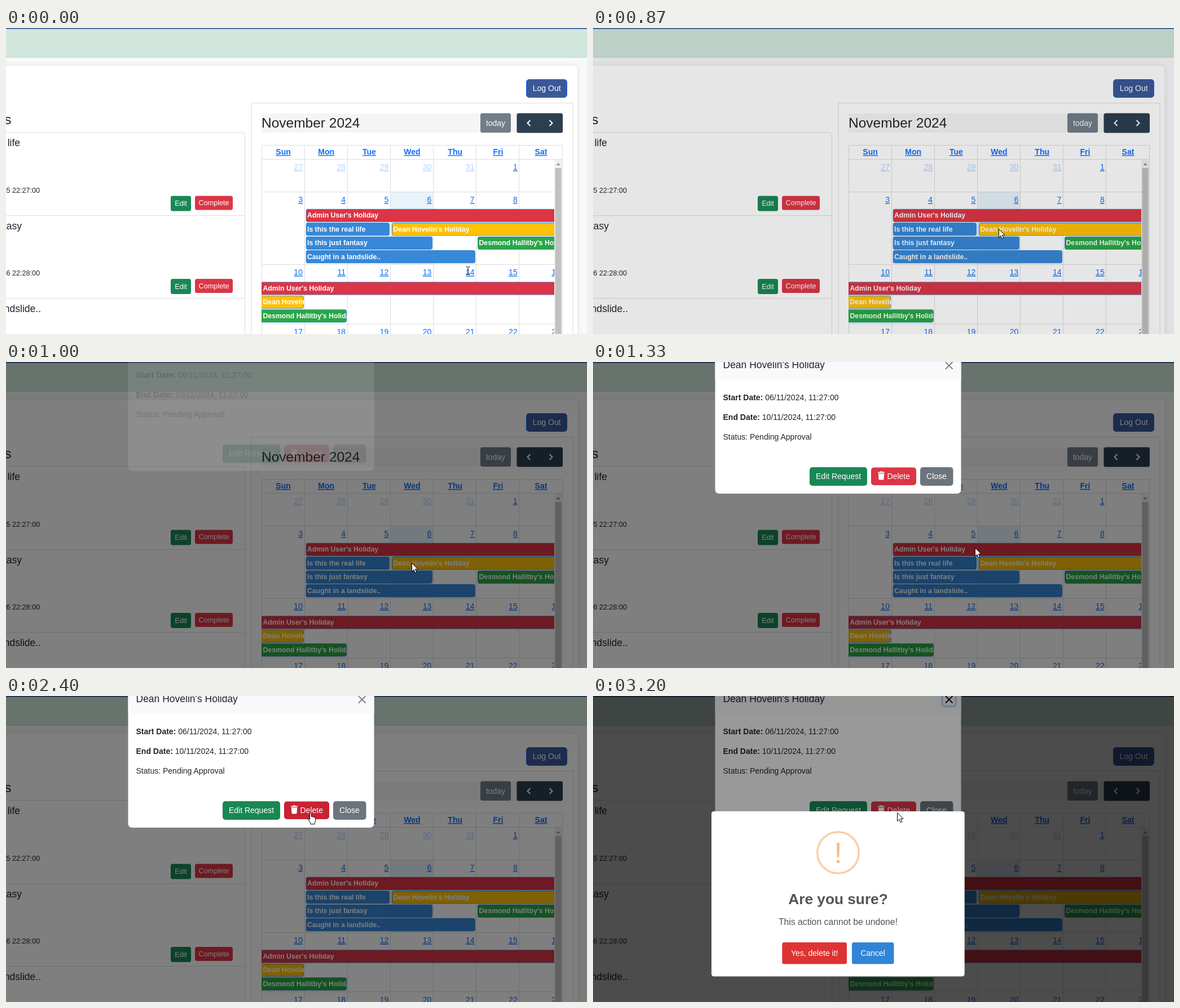
These frames come from a looping animation (1030x544 px, 6.27 s). An HTML page:

```html
<!DOCTYPE html>
<html lang="en">
<head>
<meta charset="utf-8">
<title>Holiday calendar</title>
<style>
  html, body { margin: 0; width: 100%; height: 100%; overflow: hidden; background: #f8f9fa; }
  svg { display: block; }
  text { font: 14px "Liberation Sans", Arial, sans-serif; fill: #212529; white-space: pre; }
  .mid { text-anchor: middle; }
  .end { text-anchor: end; }
  .bold { font-weight: bold; }
  .white { fill: #fff; }
  .head { font-size: 24.5px; }
  .item { font-size: 17.5px; }
  .small { font-size: 12.6px; }
  .link { fill: #0d6efd; text-decoration: underline; }
  .event { font-size: 12.25px; font-weight: bold; fill: #fff; }
  .line { fill: none; stroke: #ddd; }
  .green { fill: #198754; }
  .red { fill: #dc3545; }
  .grey { fill: #6c757d; }
  .alert { fill: #545454; }
  #page rect.card { filter: drop-shadow(0 0 4px rgba(0, 0, 0, .1)); }
</style>
</head>
<body>
<svg id="stage" width="1030" height="544" viewBox="0 0 1030 544">
  <defs>
    <clipPath id="body"><rect x="453" y="233" width="519" height="311"/></clipPath>
  </defs>

  <g id="page">
    <rect width="1030" height="544" fill="#f8f9fa"/>
    <rect y="1" width="1030" height="51.5" fill="#d1e7dd"/>
    <rect y="51.5" width="1030" height="1" fill="#badbcc"/>
    <rect width="1030" height="1.7" fill="#3b5998"/>
    <rect class="card" x="-20" y="67" width="1033" height="500" rx="7" fill="#fff"/>
    <rect x="922.5" y="91.5" width="72" height="32" rx="5" fill="#3b5998" stroke="#0d6efd"/>
    <text class="mid white" x="958.7" y="112">Log Out</text>

    <text class="head end" x="9.5" y="171">Tasks</text>
    <rect class="line" x="-20" y="185.5" width="443.5" height="400" rx="5"/>
    <path class="line" d="M0 333.5H423M0 480.5H423"/>
    <g id="tasks"></g>

    <rect class="line" x="435" y="133.5" width="570" height="430"/>
    <rect x="453" y="152" width="534" height="34" fill="#f5f5f5"/>
    <text class="head" x="453" y="177">November 2024</text>
    <g opacity=".65">
      <rect x="841" y="151.5" width="54" height="34.5" rx="3.5" fill="#2c3e50"/>
      <text class="mid white" x="868" y="174">today</text>
    </g>
    <rect x="905.5" y="151.5" width="81.5" height="35" rx="3.5" fill="#2c3e50"/>
    <path d="M929.5 164l-5 5 5 5M963.5 164l5 5-5 5" fill="none" stroke="#fff" stroke-width="2"/>
    <g id="calendar"></g>
  </g>

  <rect id="shade" width="1030" height="544"/>

  <g id="modal">
    <rect x="216.5" y="-30" width="436" height="264" rx="7" fill="#fff"/>
    <path d="M216.5 31.5V-60h436v91.5z" fill="#f8f9fa"/>
    <text class="item" x="230.5" y="11.3">Dean Hovelin's Holiday</text>
    <rect id="ring" x="618.8" y="-6.2" width="24.5" height="24.5" rx="5" fill="none" stroke="#0d6efd" stroke-opacity=".25" stroke-width="3.5"/>
    <path id="cross" d="M625.5 .5l11.5 11.5m0-11.5l-11.5 11.5" stroke="#000" stroke-width="1.8" stroke-linecap="round"/>
    <text x="230.5" y="68.3"><tspan class="bold">Start Date:</tspan> 06/11/2024, 11:27:00</text>
    <text x="230.5" y="103.3"><tspan class="bold">End Date:</tspan> 10/11/2024, 11:27:00</text>
    <text x="230.5" y="138.3">Status: Pending Approval</text>
    <rect class="green" x="384" y="187" width="102" height="33" rx="5"/>
    <text class="mid white" x="435" y="207.5">Edit Request</text>
    <rect id="del" x="493" y="187.5" width="80" height="31.5" rx="5"/>
    <path class="white" d="M505 197.2h12v-1.7h-3.8l-.8-1.2h-2.8l-.8 1.2h-3.8zM505.8 198.3h10.4l-.7 9.9q-.1 1.3-1.4 1.3h-6.2q-1.3 0-1.4-1.3z"/>
    <text class="white" x="521.5" y="207.5">Delete</text>
    <rect id="close" x="580" y="187" width="58.5" height="33" rx="5"/>
    <text class="mid white" x="609" y="207.5">Close</text>
  </g>

  <rect id="veil" width="1030" height="544"/>

  <g id="popup">
    <rect x="210" y="205" width="448.7" height="293.5" rx="4.4" fill="#fff"/>
    <g id="icon">
      <circle r="36.75" fill="none" stroke="#facea8" stroke-width="3.5"/>
      <text id="mark" class="mid" y="18.5" style="font-size:52.5px;fill:#f8bb86">!</text>
    </g>
    <text class="mid bold alert" x="434.5" y="370" style="font-size:26.25px">Are you sure?</text>
    <text class="mid alert" x="434.5" y="407.3" style="font-size:15.75px">This action cannot be undone!</text>
    <rect x="335.3" y="438" width="114.7" height="38.5" rx="3.5" fill="#d33"/>
    <text class="mid white" x="392.7" y="461.7">Yes, delete it!</text>
    <rect x="459" y="438" width="74.5" height="38.5" rx="3.5" fill="#3085d6"/>
    <text class="mid white" x="496.2" y="461.7">Cancel</text>
  </g>

  <g id="cursor" stroke="#000" stroke-linejoin="round">
    <path id="beam" fill="none" d="M-3.5-6.5h2.5l1 1 1-1h2.5M0-5.5v11M-3.5 6.5h2.5l1-1 1 1h2.5"/>
    <path id="arrow" fill="#fff" d="M.5.5v15l3.4-3.2 2.4 5.4 2.5-1.1-2.4-5.3h4.6z"/>
    <path id="hand" fill="#fff" d="M-1.5 12V1.5q0-1.4 1.4-1.4t1.4 1.4V6.5q1.3-.9 2.6.5 1.4-.8 2.5.6 2.3-.5 2.3 1.6v4.3q0 2-1.3 4v2.3h-7.6v-2.2l-3.7-5q-1.6-2.2-.4-2.9 1.200-.6 2.800 2.300z"/>
  </g>
</svg>

<script>
const $ = id => document.getElementById(id);
const label = (x, y, cls, s) => `<text x="${x}" y="${y}" class="${cls}">${s}</text>`;
const box = (x, y, w, h, cls, rx = 0) =>
  `<rect x="${x}" y="${y}" width="${w}" height="${h}" class="${cls}" rx="${rx}"/>`;

// Task list
const task = (y, right, title, date) =>
  label(right, y + 24.5, "item end", title) +
  (date ? label(60, y + 107, "small end", date) +
    box(292, y + 113, 36, 27, "green", 3.5) + label(310, y + 130.5, "small mid white", "Edit") +
    box(335, y + 113, 67, 25, "red", 3.5) + label(368.500, y + 129.700, "small mid white", "Complete") : "");

$("tasks").innerHTML =
  task(185.5, 25, "Is this the real life", "2024-11-05 22:27:00") +
  task(333, 28, "Is this just fantasy", "2024-11-06 22:28:00") +
  task(480, 62, "Caught in a landslide..");

// Calendar
const LEFT = 453.5, COL = 76.15, EDGE = 972;
const rows = [233.5, 291.5, 420.5, 526];
const RED = "#dc3545", BLUE = "#3788d8", YELLOW = "#ffc107", GREEN = "#28a745";

function bar(x, y, right, color, s) {
  const w = right - x, cutL = x < 454 ? 8 : 0, cutR = right === EDGE ? 8 : 0;
  return `<svg x="${x}" y="${y}" width="${w}" height="23.5">
    <rect x="${.5 - cutL}" y=".5" width="${w - 1 + cutL + cutR}" height="22.5" rx="3" fill="${color}" stroke="${BLUE}"/>
    ${label(2.5, 15.7, "event", s)}</svg>`;
}

function calendar() {
  let out = "", days = "", grid = `M${LEFT} 544V208.500H986.5V544M${LEFT} 233.5H986.5`;
  ["Sun", "Mon", "Tue", "Wed", "Thu", "Fri", "Sat"].forEach((d, i) => {
    out += label(LEFT + COL * (i + .5), 225, "mid bold link", d);
    if (i) grid += `M${Math.round(LEFT + COL * i) - .5} 208V544`;
  });
  rows.forEach((y, r) => {
    if (r) grid += `M${LEFT} ${y}H${EDGE}`;
    for (let c = 0; c < 7; c++) {
      const n = r * 7 + c - 4, old = n < 1;
      days += `<g opacity="${old ? .3 : 1}">` +
        label(LEFT + COL * (c + 1) - 3.7, y + 18.8, "end link", old ? n + 31 : n) + "</g>";
    }
  });
  const admin = "Admin User's Holiday", dean = "Dean Hovelin's Holiday", des = "Desmond Hallitby's Holiday";
  const bars =
    bar(531.5, 321.5, EDGE, RED, admin) +
    bar(531.5, 346, 680, BLUE, "Is this the real life") +
    bar(684, 346, EDGE, YELLOW, dean) +
    bar(531.5, 370.5, 756, BLUE, "Is this just fantasy") +
    bar(836, 370.5, EDGE, GREEN, des) +
    bar(531.5, 395, 832, BLUE, "Caught in a landslide..") +
    bar(453, 451.2, EDGE, RED, admin) +
    bar(453, 475.7, 528, YELLOW, dean) +
    bar(453, 500.2, 604, GREEN, des);
  return `<rect x="682" y="292" width="76" height="128" fill="#e8f4fa"/>
    <path class="line" d="${grid}"/>${out}
    <g clip-path="url(#body)">${days}${bars}</g>
    <rect x="972" y="234" width="14.500" height="310" fill="#f1f1f1"/>
    <path d="M975.5 244h7l-3.5-4z" fill="#8b8b8b"/>
    <rect x="973.5" y="249" width="11" height="295" fill="#c1c1c1"/>`;
}
$("calendar").innerHTML = calendar();

// Motion
const LOOP = 6270, FPS = 15;
const clamp = v => Math.min(1, Math.max(0, v));
const part = (t, start, len) => clamp((t - start) / len);

function bezier(x1, y1, x2, y2) {
  const at = (a, b, u) => 3 * a * u * (1 - u) ** 2 + 3 * b * u * u * (1 - u) + u ** 3;
  return x => {
    if (x <= 0 || x >= 1) return clamp(x);
    let lo = 0, hi = 1;
    for (let i = 0; i < 24; i++) {
      const m = (lo + hi) / 2;
      if (at(x1, x2, m) < x) lo = m; else hi = m;
    }
    return at(y1, y2, lo);
  };
}
const ease = bezier(.25, .1, .25, 1), easeOut = bezier(0, 0, .58, 1);

// Value at p on a list of [position, value, ...] stops
function along(stops, p, curve = v => v, i = 1) {
  let n = stops.findIndex(s => s[0] > p);
  if (n < 0) return stops[stops.length - 1][i];
  if (n === 0) return stops[0][i];
  const a = stops[n - 1], b = stops[n];
  return a[i] + (b[i] - a[i]) * curve((p - a[0]) / (b[0] - a[0]));
}

// Pointer stops: tick, x, y
const trail = [
  [0, 819, 431], [4, 745, 348], [6, 745, 348], [8, 719, 357], [16, 719, 357],
  [20, 677, 330], [22, 628, 268], [26, 591, 215], [29, 577, 215], [32, 577, 215],
  [36, 540, 208], [40, 540, 208], [41, 539, 207]
];
const grow = [[0, .7], [.45, 1.05], [.8, .95], [1, 1]];
const wobble = [[0, 45, 0], [.25, -25, .4], [.5, 15, .8], [.75, -5, 1], [1, 0, 1]];

const set = (id, attrs) => { for (const k in attrs) $(id).setAttribute(k, attrs[k]); };
const show = (id, on) => set(id, { display: on ? "inline" : "none" });

function draw(ms) {
  const tick = Math.floor((Math.floor(ms / 10) + .5) * FPS / 100);
  const t = tick * 1000 / FPS;
  const x = along(trail, tick), y = along(trail, tick, undefined, 2);
  const asking = tick >= 41;

  set("shade", { opacity: .5 * part(t, 837, 150) });
  const slide = easeOut(part(t, 986, 300));
  set("modal", {
    opacity: part(t, 984, 150),
    transform: `translate(0 ${-43.75 * (1 - slide)})`
  });

  const over = tick > 22 && !asking && y > 187 && y < 220;
  const onClose = over && x > 580 && x < 638, onDelete = over && x > 493 && x < 573;
  set("close", { fill: onClose ? "#5c636a" : "#6c757d" });
  set("del", { fill: tick === 39 || tick === 40 ? "#b02a37" : onDelete || tick === 41 ? "#c82333" : RED });
  show("ring", asking);
  set("cross", { opacity: asking ? 1 : .5 });

  set("veil", { opacity: .4 * ease(part(t, 2660, 100)) });
  show("popup", asking);
  const s = along(grow, part(t, 2690, 300), ease);
  set("popup", { transform: `translate(434.4 351.8) scale(${s}) translate(-434.4 -351.8)` });
  const p = part(t, 2690, 500), turn = ease(p);
  set("icon", {
    opacity: turn,
    transform: `translate(434.500 278.5) scale(1 ${Math.cos(100 * (1 - turn) * Math.PI / 180)})`
  });
  set("mark", {
    opacity: along(wobble, p, ease, 2),
    transform: `rotate(${along(wobble, p, ease)})`
  });

  const hand = (tick > 0 && tick < 13) || onClose || onDelete;
  show("beam", tick === 0);
  show("hand", hand);
  show("arrow", tick > 0 && !hand);
  set("cursor", { transform: `translate(${Math.round(x)} ${Math.round(y)})` });
}

const start = performance.now();
function loop() {
  draw((performance.now() - start) % LOOP);
  requestAnimationFrame(loop);
}
loop();
</script>
</body>
</html>
```
